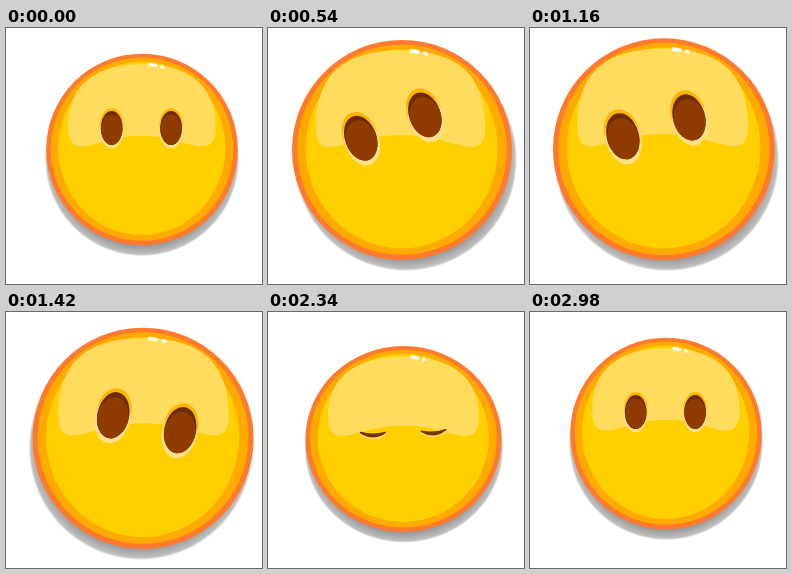
An HTML page with a canvas for the animation above (3000 ms loop, 256 px wide and 256 px high).

```html
<!DOCTYPE html>
<html>
<head>
<meta charset="utf-8">
<style>
html, body { margin: 0; width: 100%; height: 100%; overflow: hidden; background: #fff; }
canvas { display: block; width: 256px; height: 256px; }
</style>
</head>
<body>
<canvas id="stage" width="256" height="256"></canvas>
<script>
const ctx = document.getElementById('stage').getContext('2d');
const LOOP = 3000;

// Face centre and radius, offset of the gaze, tilt in degrees, squash (also shuts the eyes)
const pose = (x, y, r, lookX, lookY, tilt, squash = 0) => ({ x, y, r, lookX, lookY, tilt, squash });
const rest = pose(136, 121.5, 95.8, -0.6, -21.5, 0);
const leftLow = pose(134, 122, 110, -9.2, -23.5, -20);
const leftHigh = pose(133.3, 120, 111, -10, -24, -21.5);
const rightLow = pose(137, 126.3, 110.6, 3.7, -15.6, 12.5);
const rightHigh = pose(138, 122, 110.5, 10.2, -30, 19.5);
const squashed = pose(135.5, 127, 95.5, -0.3, -6, -2, 1);

const keys = [
  [0, rest], [540, leftLow], [860, leftHigh], [1060, leftHigh], [1420, rightLow],
  [1660, rightHigh], [2080, rightHigh], [2320, squashed], [2380, squashed], [2680, rest], [LOOP, rest]
];

function slope(i, part) {
  if (i < 0 || i >= keys.length - 1) return 0;
  return (keys[i + 1][1][part] - keys[i][1][part]) / (keys[i + 1][0] - keys[i][0]);
}

// Harmonic mean keeps the curve free of overshoot
function tangent(i, part) {
  const a = slope(i - 1, part), b = slope(i, part);
  return a * b > 0 ? 2 * a * b / (a + b) : 0;
}

function poseAt(t) {
  const i = keys.findIndex(key => key[0] > t) - 1;
  const [t0, from] = keys[i], [t1, to] = keys[i + 1];
  const h = t1 - t0, u = (t - t0) / h, v = 1 - u;
  const now = {};
  for (const part in from) {
    now[part] = from[part] * v * v * (1 + 2 * u) + to[part] * u * u * (3 - 2 * u) +
      h * u * v * (v * tangent(i, part) - u * tangent(i + 1, part));
  }
  return now;
}

function oval(x, y, rx, ry, fill) {
  ctx.beginPath();
  ctx.ellipse(x, y, rx, ry, 0, 0, Math.PI * 2);
  ctx.fillStyle = fill;
  ctx.fill();
}

function shadow(x, y, rx, ry) {
  const g = ctx.createRadialGradient(0, 0, 0.9, 0, 0, 1.01);
  g.addColorStop(0, 'rgba(0,0,0,.4)');
  g.addColorStop(0.8, 'rgba(0,0,0,.25)');
  g.addColorStop(1, 'rgba(0,0,0,0)');
  ctx.save();
  ctx.translate(x, y);
  ctx.scale(rx, ry);
  oval(0, 0, 1.02, 1.02, g);
  ctx.restore();
}

// Glossy cap: a dome over a wavy lower edge, mirrored about x
function shine(x, w, top, base, rise) {
  ctx.fillStyle = '#ffdc5d';
  for (const side of [-1, 1]) {
    const at = k => x + side * k;
    ctx.beginPath();
    ctx.moveTo(at(-0.5), top);
    ctx.lineTo(x, top);
    ctx.bezierCurveTo(at(w * 0.58), top, at(w), top + 18, at(w), base - 20);
    ctx.bezierCurveTo(at(w), base - 5, at(w - 5), base + 1, at(w - 16), base);
    ctx.bezierCurveTo(at(w - 32), base - 2, at(30), base - rise, x, base - rise);
    ctx.lineTo(at(-0.5), base - rise);
    ctx.fill();
  }
}

function sparkle(x, y, k) {
  ctx.strokeStyle = '#fff';
  ctx.lineCap = 'round';
  ctx.lineWidth = 3.6 * k;
  ctx.beginPath();
  ctx.moveTo(x - 3 * k, y - 0.5);
  ctx.lineTo(x + 3 * k, y + 0.5);
  ctx.moveTo(x + 10 * k, y + 2);
  ctx.lineTo(x + 11 * k, y + 2.2);
  ctx.stroke();
}

function lid(y, w, color) {
  ctx.beginPath();
  ctx.moveTo(-w, y - 1.5);
  ctx.quadraticCurveTo(0, y + 2, w, y - 1.5);
  ctx.quadraticCurveTo(0, y + 7, -w, y - 1.5);
  ctx.fillStyle = ctx.strokeStyle = color;
  ctx.lineWidth = 1.5;
  ctx.lineJoin = 'round';
  ctx.fill();
  ctx.stroke();
}

function eye(x, turn, rx, ry, open) {
  const k = rx / 16;
  ctx.save();
  ctx.translate(x, 0);
  ctx.rotate(turn);
  if (open < 0.13) {
    lid(1.5, rx - 0.5, '#ffe28a');
    lid(0, rx - 0.5, '#7a3200');
  } else {
    const h = ry * open;
    oval(0, -2.5 * k * open, rx + 1.5 * k, h + 1.5 * k, '#ffb400');
    oval(0, 3 * k * open, rx + 1.5 * k, h + 2 * k, '#ffe08a');
    oval(0, 0, rx, h, '#6e2b00');
    ctx.clip();
    oval(0, 5 * k * open, rx, h, '#8f3b00');
  }
  ctx.restore();
}

function draw(t) {
  const { x, y, r, lookX, lookY, tilt, squash } = poseAt(t);
  const rx = r * (1 + 0.027 * squash), ry = r * (1 - 0.027 * squash);
  const top = y - ry + 10.5;

  ctx.clearRect(0, 0, 256, 256);
  shadow(x - 0.18 * tilt, y + 9.5, rx + 0.5, ry + 0.5);
  oval(x, y, rx, ry, '#ff7a2d');
  oval(x, y - 0.3, rx * 0.953, ry * 0.956, '#ffaa00');
  oval(x - 0.3, y - 1.2, rx * 0.873, ry * 0.905, '#ffcf00');
  shine(x + 0.15 * lookX, rx * 0.77, top, y - 3, ry * 0.11);
  sparkle(x * 0.15 + 126.5, top + 0.8, r / 106);

  // Both eyes sit on one axis that tilts with the head
  const grow = r - 96;
  ctx.save();
  ctx.translate(x + lookX, y + lookY);
  ctx.rotate(tilt * Math.PI / 180);
  for (const side of [-1, 1]) {
    eye(side * rx * 0.31, -side * 0.035 * squash, 11 + 0.34 * grow + 2 * squash, 17 + 0.44 * grow, 1 - squash);
  }
  ctx.restore();
}

const start = performance.now();
function tick() {
  draw((performance.now() - start) % LOOP);
  requestAnimationFrame(tick);
}
tick();
</script>
</body>
</html>
```
